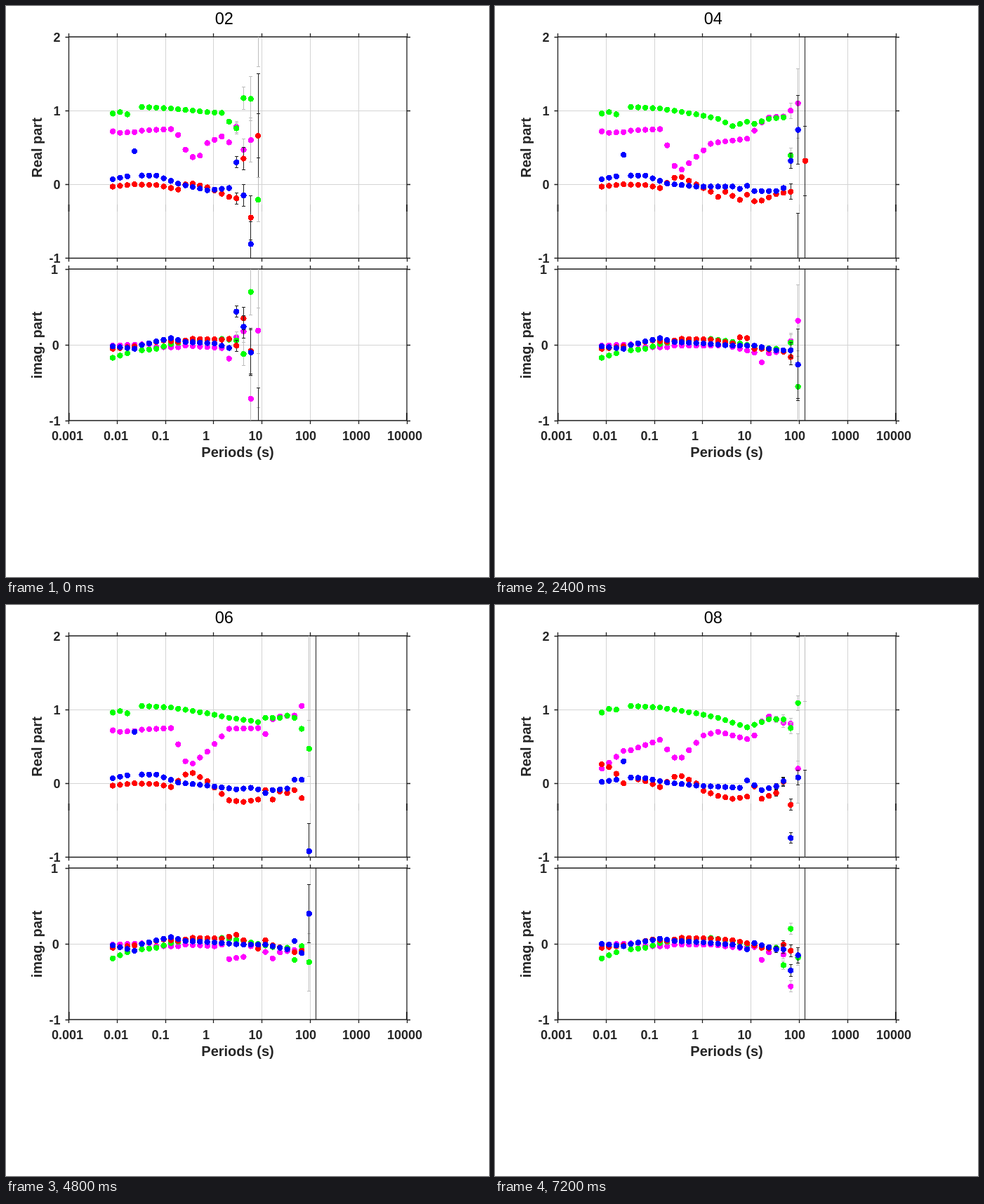
Recreate the animation shown at these times as an HTML page. Size 688 by 814 pixels, loop 8000 ms.

```html
<!DOCTYPE html>
<html lang="en">
<head>
<meta charset="utf-8">
<title>Real and imaginary parts by period</title>
<style>
html, body { margin: 0; width: 100%; height: 100%; overflow: hidden; background: #fff; }
svg { display: block; }
text { font-family: "Liberation Sans", Arial, sans-serif; fill: #262626; }
.tick { font-size: 18px; font-weight: bold; }
.label { font-size: 20px; font-weight: bold; text-anchor: middle; }
.title { font-size: 23.5px; text-anchor: middle; fill: #000; }
circle { shape-rendering: crispEdges; }
</style>
</head>
<body>
<svg id="stage" width="688" height="814" viewBox="0 0 688 814"></svg>
<script>
const stage = document.getElementById('stage');
const STEP = 1200, LOOP = 8000;
const LEFT = 89.5, RIGHT = 571, DECADE = (RIGHT - LEFT) / 7;
const REAL = { top: 44, bottom: 359.5, zero: 254.3, unit: 105.1, min: -100, max: 200 };
const IMAG = { top: 375, bottom: 591, zero: 483.2, unit: 108, min: -100, max: 100 };
const M = '#ff00ff', G = '#00ff00', R = '#ff0000', B = '#0000ff';
const DARK = '#1f1f1f', PALE = '#bdbdbd';

function el(parent, name, attrs, content) {
  const node = document.createElementNS('http://www.w3.org/2000/svg', name);
  for (const key in attrs) node.setAttribute(key, attrs[key]);
  if (content) node.textContent = content;
  parent.appendChild(node);
  return node;
}
const line = (parent, d, stroke, width) =>
  el(parent, 'path', { d, stroke, 'stroke-width': width, fill: 'none' });
const snap = v => Math.floor(v) + 0.5;
const yOf = (p, v) => p.zero - v / 100 * p.unit;
const xOf = i => 152.1 + i * DECADE * Math.log10(Math.SQRT2);

function drawAxes() {
  let grid = '', ticks = '', marks = '';
  for (const p of [REAL, IMAG]) {
    for (let k = 0; k <= 7; k++) {
      const x = snap(LEFT + k * DECADE);
      if (k > 0 && k < 7) {
        grid += `M${x} ${p.top}V${p.bottom}`;
        if (p === REAL) marks += `M${x} 283V293`;
      }
      ticks += `M${x} ${p.top}v-5M${x} ${p.bottom}v5`;
    }
    for (let v = p.min; v <= p.max; v += 100) {
      const y = snap(yOf(p, v));
      if (v > p.min && v < p.max) grid += `M${LEFT} ${y}H${RIGHT}`;
      ticks += `M${LEFT} ${y}h-5M${RIGHT} ${y}h5`;
    }
    ticks += `M${LEFT} ${p.top}H${RIGHT}V${p.bottom}H${LEFT}Z`;
  }
  line(stage, grid, '#d4d4d4', 1);
  line(stage, marks, '#c2c2c2', 1);
  line(stage, ticks, DARK, 1.3);
  line(stage, 'M89.5 283V293M571 283V293M89.7 580V591M570.8 580V591', DARK, 1.8);
}

function drawLabels() {
  const tick = (x, y, text, anchor) =>
    el(stage, 'text', { class: 'tick', x, y, 'text-anchor': anchor }, text);
  [87.5, 156.5, 220, 285, 355.5, 427, 499, 568].forEach((x, k) =>
    tick(x, 619, String(10 ** (k - 3)), 'middle'));
  ['2', '1', '0', '-1'].forEach((s, k) => tick(77.5, 50.5 + k * 105.2, s, 'end'));
  ['1', '0', '-1'].forEach((s, k) => tick(74 + k * 1.8, 381.5 + k * 108.2, s, 'end'));
  el(stage, 'text', { class: 'label', x: 330, y: 643 }, 'Periods (s)');
  el(stage, 'text', { class: 'label', transform: 'translate(51 202) rotate(-90)' }, 'Real part');
  el(stage, 'text', { class: 'label', transform: 'translate(51 483.5) rotate(-90)' }, 'imag. part');
}

drawAxes();
drawLabels();
const title = el(stage, 'text', { class: 'title', x: 310.8, y: 26 });

// Typical response as { index: hundredths }; the rest is interpolated.
const realBase = {
  [M]: { 0: 72, 1: 70, 3: 71, 4: 73, 8: 75, 9: 53, 10: 30, 11: 24, 16: 70, 20: 68, 22: 84, 23: 91, 25: 92 },
  [G]: { 0: 96, 1: 98, 2: 95, 3: 0, 4: 105, 8: 103, 13: 95, 16: 89, 20: 83, 23: 89, 25: 90 },
  [R]: { 0: -3, 3: 0, 6: -1, 8: -5, 10: 9, 11: 10, 13: 0, 16: -17, 20: -18, 22: -22, 24: -13 },
  [B]: { 0: 7, 2: 11, 4: 12, 6: 12, 9: 1, 13: -3, 19: -6, 22: -9, 24: -9 }
};
const imagBase = {
  [M]: { 0: -1, 2: 0, 5: 1, 6: -3, 9: -3, 10: -1, 15: -1, 19: -5, 22: -19, 23: -11, 25: -8 },
  [G]: { 0: -17, 2: -11, 3: -2, 4: -7, 6: -5, 8: 1, 11: 6, 15: 8, 18: 4, 22: -4, 24: -5 },
  [R]: { 0: -5, 3: -2, 7: 6, 9: 4, 11: 8, 15: 7, 18: 5, 22: -5, 24: -7 },
  [B]: { 0: -2, 3: -5, 4: 0, 8: 9, 10: 4, 14: 2, 18: -1, 21: -1, 24: -7 }
};

const sites = [];
let site;

// err: size of the error bars at index last, shrinking by decay per step back
function open(name, last, err, decay) {
  site = { name, last, err, decay, group: el(stage, 'g', { display: 'none' }) };
  sites.push(site);
}

function span(p, i, hi, lo, stroke) {
  if (hi < p.min || lo > p.max) return;
  const x = snap(xOf(i));
  let d = `M${x} ${Math.max(p.top, yOf(p, hi))}V${Math.min(p.bottom, yOf(p, lo))}`;
  for (const v of [hi, lo]) {
    if (v > p.min && v < p.max) d += `M${x - 2.5} ${snap(yOf(p, v))}h5`;
  }
  line(site.group, d, stroke, 1);
}

function valueAt(keys, i) {
  const idx = Object.keys(keys).map(Number);
  const b = idx.find(k => k >= i);
  const a = idx.filter(k => k <= i).pop();
  return a === b ? keys[a] : keys[a] + (keys[b] - keys[a]) * (i - a) / (b - a);
}

// own: keys that differ from the typical response; the last one ends the series
function plot(p, color, base, own) {
  const keys = { ...base, ...own };
  const end = Math.max(...Object.keys(own));
  const stroke = color === R || color === B ? DARK : PALE;
  const values = Array.from({ length: end + 1 }, (_, i) => valueAt(keys, i));
  values.forEach((v, i) => {
    const e = site.err * Math.min(1, site.decay ** (site.last - i));
    if (e > 4) span(p, i, v + e, v - e, stroke);
  });
  values.forEach((v, i) => {
    if (v >= p.min && v <= p.max) el(site.group, 'circle', { cx: xOf(i), cy: yOf(p, v), r: 4.2, fill: color });
  });
}
const real = (color, own) => plot(REAL, color, realBase[color], own);
const imag = (color, own) => plot(IMAG, color, imagBase[color], own);
const fullBar = (p, i, stroke) => span(p, i, 300, -300, stroke);

open('02', 19, 30, 0.5);
span(REAL, 20, 250, 160, PALE);
span(REAL, 20, 150, -18, DARK);
span(IMAG, 20, 150, -83, PALE);
span(IMAG, 20, -57, -160, DARK);
real(M, { 9: 67, 10: 47, 11: 37, 12: 39, 13: 56, 15: 65, 16: 57, 17: 78, 18: 47, 19: 60 });
real(G, { 13: 98, 15: 97, 16: 85, 17: 76, 18: 117, 19: 116, 20: -21 });
real(R, { 9: -7, 10: 0, 11: 1, 13: -4, 17: -19, 18: 35, 19: -45, 20: 66 });
real(B, { 3: 45, 13: -8, 16: -5, 17: 30, 18: -15, 19: -81 });
imag(M, { 15: -4, 16: -18, 17: 10, 18: 18, 19: -71, 20: 19 });
imag(G, { 17: 6, 18: -12, 19: 70 });
imag(R, { 16: 8, 17: -1, 18: 35, 19: -8 });
imag(B, { 16: -4, 17: 44, 18: 24, 19: -10 });

open('03', 28, 24, 0.2);
span(REAL, 28, 230, 177, DARK);
real(M, { 15: 54, 16: 54, 21: 56, 22: 78, 26: 94, 27: 129, 28: 161 });
real(G, { 19: 77, 21: 79, 22: 72, 23: 90, 26: 92, 27: 87, 28: 98 });
real(R, { 10: 3, 11: 2, 13: 1, 16: -11, 18: -5, 20: -20, 22: -30, 23: -16, 26: -10, 27: -44 });
real(B, { 3: 40, 18: -2, 21: -2, 23: -11, 26: 1, 27: 0, 28: -53 });
imag(M, { 18: -3, 20: -15, 21: 3, 25: -15, 26: -8, 27: -33 });
imag(G, { 26: -9, 27: -16, 28: -13 });
imag(R, { 20: 11, 22: -13, 23: -6, 26: -8, 27: -22, 28: -6 });
imag(B, { 22: 3, 23: -6, 26: -8, 27: 1, 28: 36 });

open('04', 27, 47, 0.22);
span(REAL, 27, -39, -160, DARK);
span(IMAG, 27, -71, -160, DARK);
fullBar(REAL, 28, DARK);
fullBar(IMAG, 28, DARK);
real(M, { 10: 25, 11: 20, 15: 55, 16: 57, 20: 62, 26: 100, 27: 110 });
real(G, { 15: 91, 18: 79, 20: 85, 21: 82, 25: 91, 26: 39 });
real(R, { 15: -10, 17: -10, 19: -21, 20: -14, 21: -23, 26: -10, 27: -200, 28: 32 });
real(B, { 3: 40, 18: -3, 20: -2, 21: -9, 25: -5, 26: 32, 27: 74 });
imag(M, { 17: 0, 21: -10, 22: -23, 25: -8, 26: 5, 27: 32 });
imag(G, { 25: -7, 26: 3, 27: -55 });
imag(R, { 18: 2, 19: 10, 20: 9, 21: -5, 25: -9, 26: -16 });
imag(B, { 26: -7, 27: -26 });

open('05', 28, 20, 0.2);
real(M, { 11: 21, 13: 41, 17: 76, 19: 61, 20: 61, 27: 95, 28: 123 });
real(G, { 20: 79, 21: 86, 24: 90, 25: 86, 27: 86, 28: 81 });
real(R, { 9: 3, 10: 14, 11: 15, 17: -23, 18: -20, 19: -6, 20: -10, 25: -11, 27: -8, 28: -47 });
real(B, { 3: 55, 24: -11, 25: 0, 27: 6, 28: -20 });
imag(M, { 15: 1, 17: -17, 18: -18, 19: -3, 20: -2, 21: -19, 27: -7, 28: -15 });
imag(G, { 25: -1, 26: -10, 27: 11, 28: 11 });
imag(R, { 16: 4, 17: 15, 18: 5, 20: -6, 21: 5, 22: -2, 27: -10, 28: -78 });
imag(B, { 26: -10, 27: -6, 28: 5 });

open('06', 27, 38, 0.1);
span(REAL, 27, 300, 85, PALE);
fullBar(REAL, 28, DARK);
fullBar(IMAG, 28, DARK);
real(M, { 11: 27, 13: 43, 16: 74, 20: 75, 21: 67, 22: 87, 26: 105 });
real(G, { 19: 85, 21: 89, 24: 92, 25: 89, 26: 74, 27: 47 });
real(R, { 10: 12, 11: 14, 13: 3, 16: -23, 18: -25, 20: -22, 21: -9, 23: -11, 25: -9, 26: -20 });
real(B, { 3: 70, 17: -8, 20: -8, 21: -13, 24: -7, 25: 5, 26: 5, 27: -92 });
imag(M, { 14: -3, 16: -20, 18: -17, 19: -3, 20: -2, 26: -8 });
imag(G, { 0: -19, 25: -21, 26: -3, 27: -24 });
imag(R, { 17: 12, 18: 5, 20: -6, 21: 5, 22: -2, 25: -11, 26: -9 });
imag(B, { 3: -9, 25: 4, 26: -12, 27: 40 });

open('07', 26, 43, 0.08);
span(REAL, 27, 78, -160, PALE);
span(REAL, 27, -13, -160, DARK);
fullBar(REAL, 28, DARK);
real(M, { 0: 65, 1: 66, 3: 68, 4: 70, 8: 73, 9: 59, 10: 37, 11: 34, 14: 66, 16: 74, 20: 79, 21: 70, 25: 94, 26: 92 });
real(G, { 1: 99, 2: 98, 18: 86, 22: 83, 24: 89, 25: 100, 26: 61 });
real(R, { 0: 0, 12: 4, 13: -4, 14: -13, 16: -21, 21: -15, 22: -6, 23: -16, 24: -6, 25: -30, 26: -30 });
real(B, { 3: 59, 18: -5, 21: -12, 24: -11, 25: 0, 26: -15 });
imag(M, { 14: 0, 18: -13, 24: -5, 25: 10, 26: 95 });
imag(G, { 0: -19, 21: -10, 24: 0, 25: -26, 26: -13 });
imag(R, { 13: 10, 20: 4, 22: -15, 24: -2, 25: -8, 26: 68 });
imag(B, { 3: -7, 20: -4, 24: -8, 25: 1, 26: 1 });

open('08', 27, 10, 0.75);
span(REAL, 27, 231, 199, DARK);
span(REAL, 27, 67, -27, PALE);
fullBar(REAL, 28, PALE);
span(REAL, 28, 111, -300, PALE);
span(REAL, 28, 18, -300, DARK);
fullBar(IMAG, 28, DARK);
real(M, { 0: 20, 1: 28, 3: 44, 4: 45, 8: 59, 9: 46, 10: 35, 11: 35, 14: 65, 20: 60, 21: 65, 25: 82, 26: 81, 27: 20 });
real(G, { 1: 101, 2: 100, 20: 76, 23: 87, 25: 87, 26: 75, 27: 109 });
real(R, { 0: 26, 1: 22, 2: 13, 4: 8, 6: 3, 14: -10, 18: -21, 21: -4, 22: -21, 25: 2, 26: -29 });
real(B, { 0: 2, 2: 5, 3: 30, 4: 8, 6: 7, 20: 4, 24: -4, 25: 3, 26: -74, 27: 8 });
imag(M, { 21: -4, 22: -21, 24: -6, 25: -14, 26: -56 });
imag(G, { 0: -19, 25: -28, 26: 20, 27: -18 });
imag(R, { 20: 1, 25: -1, 26: -9 });
imag(B, { 0: 0, 3: -3, 8: 7, 20: -7, 21: 1, 25: -7, 26: -35, 27: -15 });

let shown = -1;
function render(now) {
  const k = Math.floor((now % LOOP) / STEP);
  if (k === shown) return;
  sites.forEach((s, i) => s.group.setAttribute('display', i === k ? 'inline' : 'none'));
  title.textContent = sites[k].name;
  shown = k;
}
const start = performance.now();
function loop() {
  render(performance.now() - start);
  requestAnimationFrame(loop);
}
loop();
</script>
</body>
</html>
```
